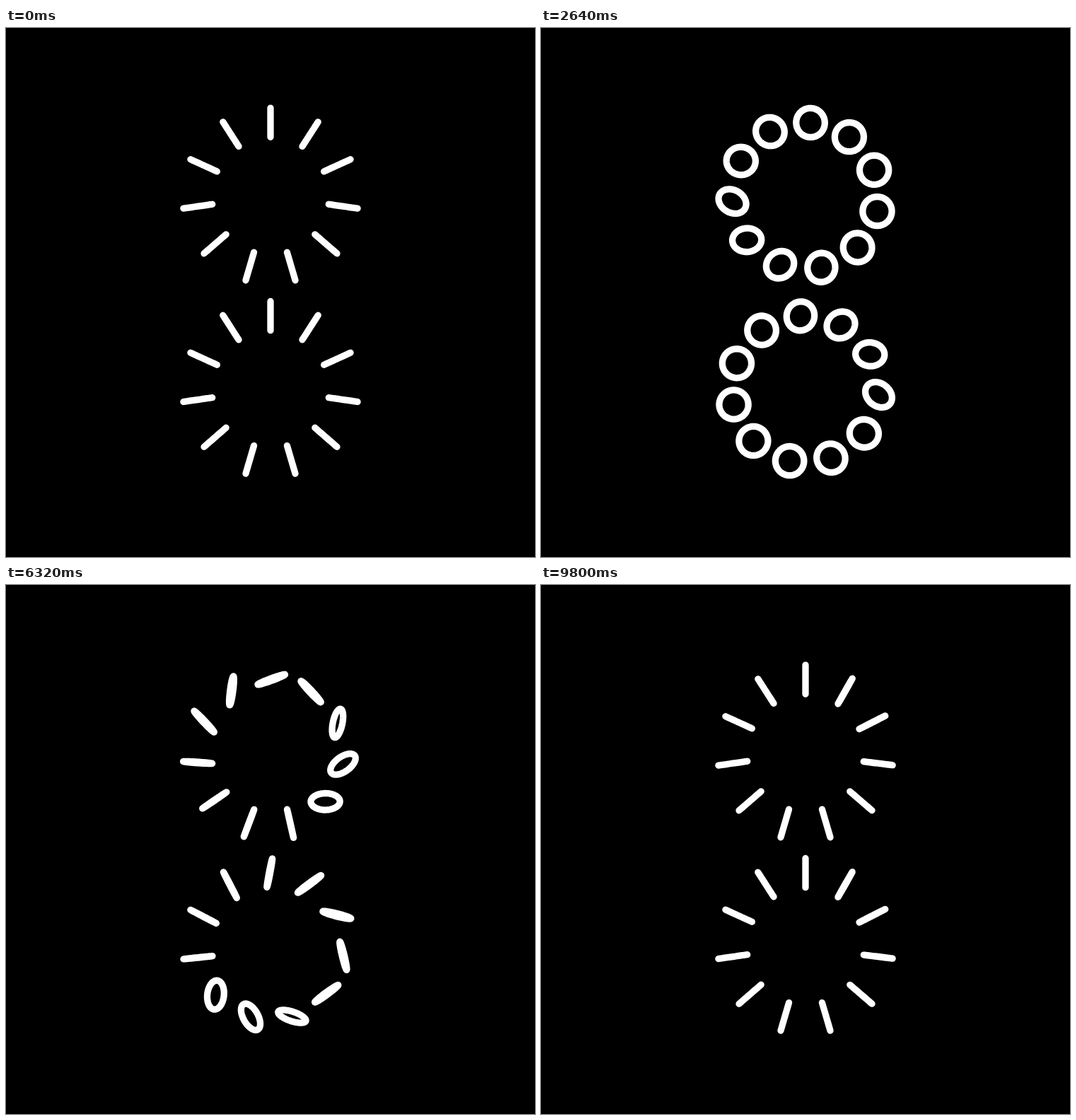
Recreate the animation shown at these times as an HTML page. Size 748 by 748 pixels, loop 9840 ms.

```html
<!DOCTYPE html>
<html lang="en">
<head>
<meta charset="utf-8">
<title>Turning rings</title>
<style>
  html, body { margin: 0; width: 100%; height: 100%; overflow: hidden; background: #000; }
  svg { display: block; width: 100vw; height: 100vh; }
</style>
</head>
<body>
<svg id="stage" viewBox="0 0 748 748">
  <rect width="748" height="748" fill="#000"/>
  <g id="rings" fill="none" stroke="#fff" stroke-width="9.3" stroke-linejoin="round"></g>
</svg>
<script>
const STEP = 40, LOOP = 9840;
const TURN_A = 126, TURN_B = 119;   // steps for each half turn
const FLIP = 100.8, LAG = 25.2;     // steps of one flip, and the longest delay
const COUNT = 11, ORBIT = 103.75, RADIUS = 20.6, SIDES = 64;
const WHEELS = [{ y: 237.4, dir: -1 }, { y: 510.8, dir: 1 }];
const DEG = Math.PI / 180;

const layer = document.getElementById('rings');
for (const wheel of WHEELS) {
  wheel.rings = Array.from({ length: COUNT }, () => {
    const path = document.createElementNS('http://www.w3.org/2000/svg', 'path');
    return layer.appendChild(path);
  });
}

const clamp = x => Math.min(1, Math.max(0, x));
const smooth = x => x * x * (3 - 2 * x);

function bezier(x1, y1, x2, y2) {
  const at = (a, b, u) => 3 * u * (1 - u) * (1 - u) * a + 3 * u * u * (1 - u) * b + u * u * u;
  return x => {
    let lo = 0, hi = 1;
    for (let n = 0; n < 26; n++) {
      const mid = (lo + hi) / 2;
      if (at(x1, x2, mid) < x) lo = mid; else hi = mid;
    }
    return x <= 0 ? 0 : x >= 1 ? 1 : at(y1, y2, lo);
  };
}
const spin = bezier(2 / 3, 0, 1 / 3, 1);
const open = bezier(0.8, 0, 0.45, 0.65);

// Roll angle (degrees) and minor radius of a ring seen from the front.
function pose(tau) {
  const x = clamp(Math.min(tau, FLIP - tau) / (FLIP / 2));
  const side = tau > FLIP / 2 ? -1 : 1;
  const a = 180 * DEG * spin(x);
  const b = 90 * DEG * (1 - open(x));
  return {
    roll: side * Math.atan2(Math.sin(a), Math.cos(a) * Math.sin(b)) / DEG,
    minor: RADIUS * Math.abs(Math.cos(a) * Math.cos(b))
  };
}

function outline(minor) {
  let d = '';
  for (let n = 0; n < SIDES; n++) {
    const u = n / SIDES * 2 * Math.PI;
    d += (n ? 'L' : 'M') + (minor * Math.sin(u)).toFixed(3) + ' ' + (-RADIUS * Math.cos(u)).toFixed(3);
  }
  return d + 'Z';
}

function draw(ms) {
  const step = Math.floor((ms % LOOP) / STEP);
  const second = step >= TURN_A;
  const k = second ? step - TURN_A : step;
  const turn = second ? 180 + 180 * k / TURN_B : 180 * k / TURN_A;

  for (let i = 0; i < COUNT; i++) {
    const { roll, minor } = pose(k - LAG * smooth(i / (COUNT - 1)));
    const d = outline(minor);
    for (const { y, dir, rings } of WHEELS) {
      const angle = dir * turn - i * 360 / COUNT;
      rings[i].setAttribute('d', d);
      rings[i].setAttribute('transform',
        `translate(374 ${y}) rotate(${angle}) translate(0 ${-ORBIT}) rotate(${roll})`);
    }
  }
}

let start;
function tick(now) {
  if (start === undefined) start = now;
  draw(Math.max(0, now - start));
  requestAnimationFrame(tick);
}
draw(0);
requestAnimationFrame(tick);
</script>
</body>
</html>
```
